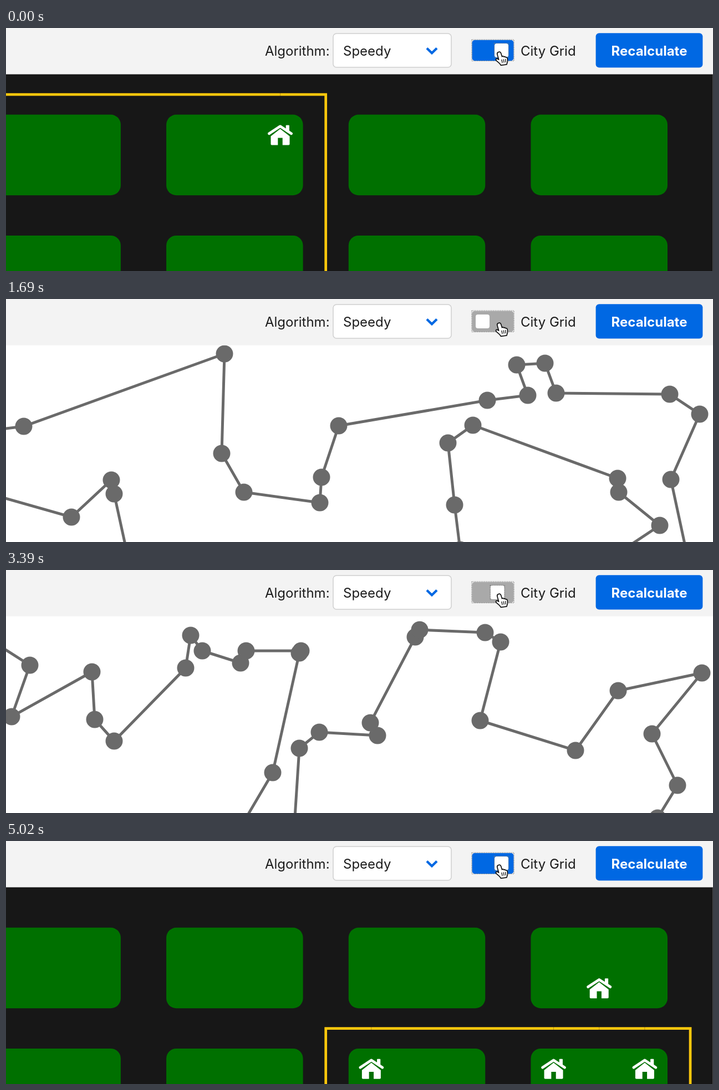
These frames come from a looping animation (1275 px wide and 439 px high, 5.05 s). An HTML page:

```html
<!DOCTYPE html>
<html lang="en">
<head>
<meta charset="utf-8">
<title>Route planner</title>
<style>
  html, body { margin: 0; width: 100%; height: 100%; overflow: hidden; background: #fff; }
  svg { display: block; width: 100vw; height: 100vh; }
  text { font: 400 24px Inter, "Open Sans", sans-serif; fill: #1b1b1b; }
  .bold { font-weight: 700; fill: #fff; }
  .tour { fill: none; stroke: #6a6a6a; stroke-width: 5; marker: url(#node); }
  .route { fill: none; stroke: #fdc70c; stroke-width: 4.7; }
  .tick { stroke: #171717; stroke-opacity: .3; }
  .focus { fill: none; stroke: #777; stroke-width: 1.2; stroke-dasharray: 1.6 1.6; }
</style>
</head>
<body>
<svg viewBox="0 0 1275 439" preserveAspectRatio="none">
  <defs>
    <marker id="node" markerUnits="userSpaceOnUse" markerWidth="32" markerHeight="32" refX="16" refY="16">
      <circle cx="16" cy="16" r="15.5" fill="#6a6a6a"/>
    </marker>
    <g id="house" fill="#fff">
      <path d="M0-10.8 17 2.5V16.7Q17 18.4 15.3 18.4H4.2V5.6H-4.2V18.4H-15.3Q-17 18.4 -17 16.7V2.5Z"/>
      <path d="M-20-2.2 0-15.4 20-2.2" fill="none" stroke="#fff" stroke-width="4.8" stroke-linecap="round" stroke-linejoin="round"/>
      <rect x="10.2" y="-17.6" width="6.2" height="12" rx="1"/>
    </g>
  </defs>
  <g id="tours">
    <path class="tour" d="M-40 239 32 230 394 99 389 279 429 349 566 368 569 322 600 229 868 183 941 174 921 119 972 116 992 170 1197 172 1251 208 1199 326 1228 461
      M-40 349 118 394 190 327 195 352 219 462
      M819 453 809 372 797 260 842 228 1103 324 1105 349 1179 409 1104 459"/>
    <path class="tour" d="M-40 119 43 172 10 265 155 184 160 270 195 309 324 177 333 118 354 146 423 168 433 146 532 146 529 150 481 366 424 463
      M520 462 529 322 565 293 670 299 657 276 738 121 746 108 864 113 892 130 855 272 1027 326 1104 218 1255 186 1165 296 1211 389 1175 448"/>
  </g>
  <g id="city">
    <rect y="83" width="1275" height="356" fill="#171717"/>
    <rect x="1274" y="84" width="1" height="355" fill="#4a4a4a"/>
    <g id="blocks" fill="#007000"></g>
    <g id="routes"></g>
  </g>
  <rect width="1275" height="83.6" fill="#f3f3f3"/>
  <text x="467" y="49.5">Algorithm:</text>
  <rect x="590" y="10" width="213" height="61" rx="6" fill="#fff" stroke="#cfcfcf" stroke-width="1.5"/>
  <text x="608" y="49.5">Speedy</text>
  <path d="M759 36.5 768 45.3 777 36.5" fill="none" stroke="#0068e3" stroke-width="4.3"/>
  <rect id="track" x="840.5" y="21.7" width="75" height="37.6" rx="5"/>
  <rect id="trackFocus" class="focus" x="840" y="21" width="76" height="38.5"/>
  <g id="thumb">
    <rect x="847" y="28" width="25" height="25" rx="4" fill="#fff"/>
    <rect id="thumbFocus" class="focus" x="846.5" y="27.5" width="26" height="26"/>
  </g>
  <text x="928" y="49.5">City Grid</text>
  <rect x="1063.6" y="9.2" width="192.8" height="62.2" rx="6" fill="#0068e3"/>
  <text class="bold" x="1160" y="49.5" text-anchor="middle">Recalculate</text>
  <g stroke="#111" stroke-width="1.7" stroke-linejoin="round" stroke-linecap="round">
    <path fill="#fff" d="M888 43.6c2-1 3.9-.2 4.5 1.6l2.1 6.6c1-1.3 3-1 3.5.5 1.1-1 2.7-.7 3.2.8 1.4-.6 2.7.1 2.9 1.7l.4 4.4c.1 2.5-1.2 4-1.6 6.7l-10.5 1.4c-1.4-3.2-4.6-5-6.9-7.2-1.7-1.5-2.9-3.2-1.7-4.3 1.5-1.1 3.3-.1 4.7 1.3l-2.7-9.6c-.5-1.8.2-3.2 2.1-3.9Z"/>
    <path fill="none" stroke-width="1.3" d="M894 57.5l1 5M897.3 57l.8 5M900.6 56.5l.6 5"/>
  </g>
</svg>
<script>
const LOOP = 5050, SLIDE = 250, BLUR = 90, TRAVEL = 34;
const LOT_W = 82.17, LOT_H = 72.8;
const $ = id => document.getElementById(id);
const show = (el, on) => { el.style.display = on ? "" : "none"; };

// The city is a lattice of lots: every fourth column and every third row is a road.
const lotX = col => 1.5 + col * LOT_W;
const lotY = row => 120.2 + row * LOT_H;

const routes = [
  { left: -1, right: 7, top: 0, houses: [[6, 1]] },
  { left: 7, right: 15, top: 3, houses: [[13, 2], [8, 4], [12, 4], [14, 4]] }
];

// Each state begins with a click on the switch.
const states = [
  { at: -1000, city: true, scene: 0 },
  { at: 830, city: false, scene: 0 },
  { at: 2058, city: true },
  { at: 3350, city: false, scene: 1 },
  { at: 4755, city: true, scene: 1, delay: 125 }
];

const block = (col, row) =>
  `<rect x="${lotX(col - .5)}" y="${lotY(row + .5)}" width="${3 * LOT_W}" height="${2 * LOT_H}" rx="18"/>`;

function route({ left, right, top, houses }) {
  const y = lotY(top);
  const line = `<path class="route" d="M${lotX(left)} 450V${y}H${lotX(right)}V450"/>`;
  const stops = houses.map(([col, row]) =>
    `<path class="tick" d="M${lotX(col)} ${y - 2.5}v5"/>` +
    `<use href="#house" x="${lotX(col)}" y="${lotY(row)}"/>`);
  return `<g>${line}${stops.join("")}</g>`;
}

for (let row = 0; row < 6; row += 3)
  for (let col = 0; col < 16; col += 4)
    $("blocks").innerHTML += block(col, row);
$("routes").innerHTML = routes.map(route).join("");

// The CSS "ease" curve, cubic-bezier(.25, .1, .25, 1).
function ease(x) {
  if (x <= 0 || x >= 1) return x <= 0 ? 0 : 1;
  const bezier = (a, b, s) => 3 * a * s * (1 - s) ** 2 + 3 * b * s * s * (1 - s) + s ** 3;
  let low = 0, high = 1;
  for (let i = 0; i < 20; i++) {
    const mid = (low + high) / 2;
    if (bezier(.25, .25, mid) < x) low = mid; else high = mid;
  }
  return bezier(.1, 1, low);
}

function draw(t) {
  const index = states.findLastIndex(s => t >= s.at);
  const { at, city, scene, delay = 0 } = states[index];
  const next = states[index + 1];
  const focused = !next || t < next.at - BLUR;
  const moved = ease((t - at) / SLIDE);
  const position = city ? moved : 1 - moved;

  show($("city"), city);
  [...$("tours").children].forEach((tour, i) => show(tour, !city && i === scene));
  [...$("routes").children].forEach((g, i) => show(g, i === scene && t >= at + delay));
  $("track").setAttribute("fill", city ? "#0068e3" : "#a9a9a9");
  $("thumb").setAttribute("transform", `translate(${position * TRAVEL} 0)`);
  show($("trackFocus"), focused);
  show($("thumbFocus"), focused && position > 0.01);
}

const start = performance.now();
function tick() {
  draw((performance.now() - start) % LOOP);
  requestAnimationFrame(tick);
}
tick();
</script>
</body>
</html>
```
